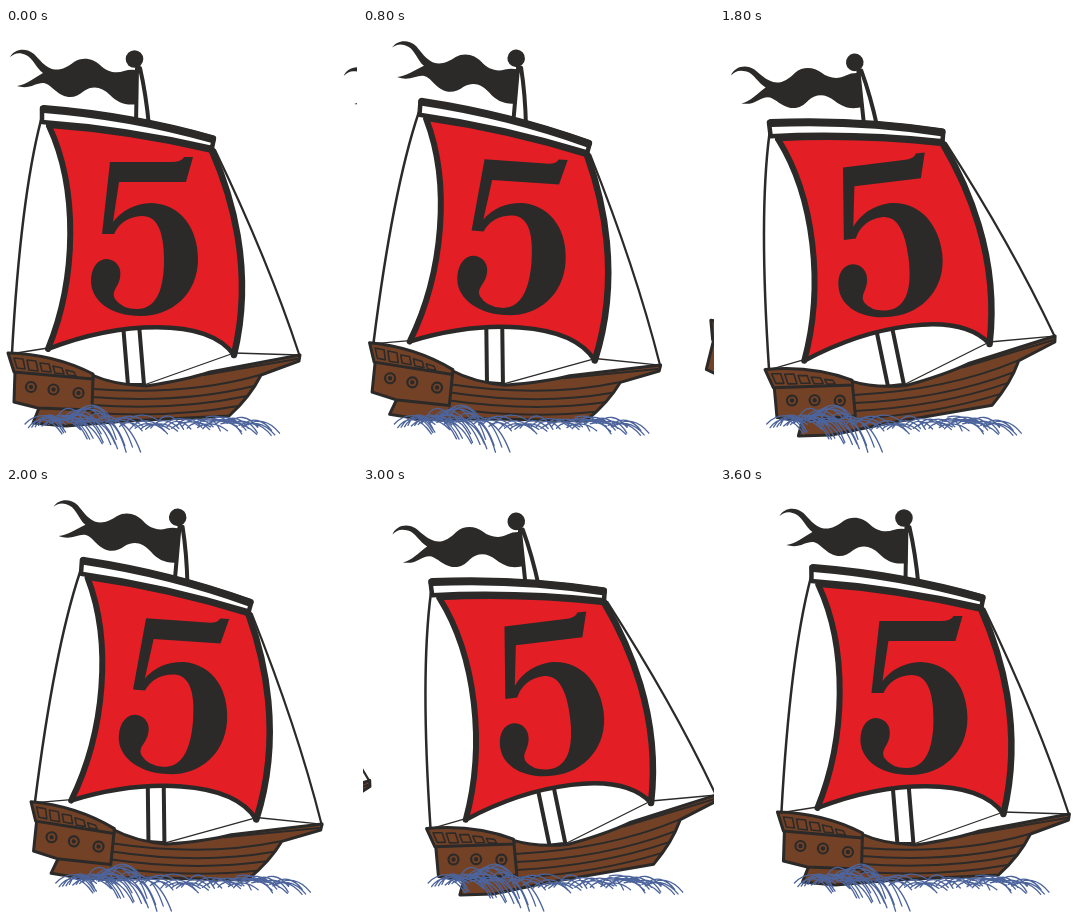
Animation of 351 by 431 pixels, one loop 3.8 s. Source, as an HTML page:

```html
<!DOCTYPE html>
<html lang="en">
<head>
<meta charset="utf-8">
<title>Sailing ship</title>
<style>
  html, body { margin: 0; width: 100%; height: 100%; overflow: hidden; background: #fff; }
  svg { display: block; width: 351px; height: 431px; }
  .ink { fill: #2b2a29; }
  .line { fill: none; stroke: #2b2a29; stroke-linecap: round; stroke-linejoin: round; }
  .wood { fill: #734226; stroke: #2b2a29; stroke-width: 3; stroke-linejoin: round; }
  .ring { fill: #734226; stroke: #2b2a29; stroke-width: 2.2; }
  .white { fill: #fff; stroke: #2b2a29; stroke-linejoin: round; }
  .sail { fill: #e31e24; }
  .water { fill: none; stroke: #4c649b; stroke-width: 1.3; stroke-linecap: round; }
</style>
</head>
<body>
<svg viewBox="0 0 351 431">
  <defs>
    <g id="ship">
      <!-- rigging -->
      <path class="line" stroke-width="2.5" d="M35 92C20 150 11 235 6 325"/>
      <path class="line" stroke-width="2.2" d="M209 122C236 178 270 256 293 326"/>
      <path class="line" stroke-width="1.3" d="M4 326L42 320M138 357L228 325L293 327"/>

      <!-- mast and flag -->
      <path class="white" stroke-width="4" d="M117 296L122 357H138L133 296"/>
      <path class="white" stroke-width="4" d="M130 96L131 40H134Q140 66 143 98"/>
      <path class="ink" d="M4 29C8 21 20 19 28 26C34 32 38 38 46 41C54 43 60 40 68 34C77 28 88 31 94 37C101 44 110 46 118 43Q124 41 130 42L132 76C120 78 112 75 104 67C96 59 87 57 78 63C71 69 64 71 56 67C48 63 44 56 38 55C30 54 24 62 11 58C20 57 28 50 37 45C30 40 27 30 20 27C13 24 9 25 4 29Z"/>
      <circle class="ink" cx="128.500" cy="31" r="8.800"/>

      <!-- sail and yard -->
      <path class="sail" d="M43 98Q125 104 206 123C224 164 249 240 228 327C200 288 112 294 42 321C71 250 72 160 43 98Z"/>
      <path class="line" stroke-width="6" d="M43 97Q125 103 206 122"/>
      <path class="line" stroke-width="6.500" d="M206 123C224 164 249 240 228 327"/>
      <path class="line" stroke-width="4.500" d="M228 327C200 288 112 294 42 321"/>
      <path class="line" stroke-width="6" d="M42 321C71 250 72 160 43 98"/>
      <path class="white" stroke-width="4.500" d="M36 80Q125 87 208 110L206 120Q120 100 36 94Z"/>
      <path class="line" stroke-width="8" d="M38 81Q125 88 206 111"/>
      <path class="ink" role="img" aria-label="5" d="M104 134H165Q176 134 178 129H187L180 154H113L107 194Q121 176 145 175C176 176 192 202 192 231C192 266 166 288 135 288C104 288 85 272 85 253C85 239 92 231 101 231C111 232 116 240 114 250C112 260 105 263 109 271Q116 281 131 281C153 281 158 256 158 232C158 203 151 188 136 188Q116 189 108 206H96Z"/>

      <!-- hull -->
      <path class="wood" d="M86 347Q108 357 140 358Q180 352 204 344L294 327L293 333L255 347Q244 369 223 388L120 393L60 398L27 395L33 380Z"/>
      <path class="line" stroke-width="2" d="M87 361Q180 368 254 347M86 369Q175 376 248 358M86 377Q170 383 241 368M86 385Q165 390 232 378M198 347L291 331"/>
      <path class="wood" d="M9 343L87 349L86 382L32 380L8 374Z"/>
      <path class="wood" stroke-width="4" d="M2 325Q48 326 87 346V351L8 344Z"/>
      <path class="line" stroke-width="1.600" d="M8 330L17 331L19 341L11 340ZM21 332L30 333L32 343L23 342ZM34 335L43 336L45 344L36 343ZM47 338L56 340L58 346L49 345ZM60 342L68 344L70 348L62 347Z"/>
      <g class="ring">
        <circle cx="25" cy="359" r="5"/>
        <circle cx="47.500" cy="361.500" r="5"/>
        <circle cx="72.500" cy="365" r="5"/>
      </g>
      <g class="ink">
        <circle cx="25" cy="359" r="2.200"/>
        <circle cx="47.500" cy="361.500" r="2.200"/>
        <circle cx="72.500" cy="365" r="2.200"/>
      </g>
    </g>
  </defs>
  <g id="fleet">
    <use href="#ship"/>
    <use href="#ship"/>
    <use href="#ship"/>
  </g>
  <path id="water" class="water"/>
</svg>
<script>
  const STEP = 200, LOOP = 3800, DRIFT = 3.08, SPACING = 355;
  const TILT = [0, -7.2, -12, -7, 4, 12.2];
  const ships = [...document.getElementById('fleet').children];
  const water = document.getElementById('water');

  let seed = 7;
  const rand = (min, max) => {
    seed = (seed * 16807) % 2147483647;
    return min + (max - min) * seed / 2147483647;
  };

  // Each strand rises over a small crest, then sweeps down to the right.
  const strand = (x, y, width, crest, drop) =>
    `M${x} ${y}c${width * 0.25} ${-crest} ${width * 0.65} ${-crest} ${width} ${drop}`;

  function drawWater() {
    let d = '';
    for (let i = 0; i < 17; i++) {
      d += strand(19 + i * 3.4, 399 - i * 0.7 + rand(-3, 3), rand(24, 42), rand(9, 17), rand(-2, 9));
    }
    for (let i = 0; i < 14; i++) {
      d += strand(50 + i * 3.8, 391 + rand(-3, 5), rand(26, 36), rand(2, 9), 16 + i * 0.9 + rand(-3, 4));
    }
    for (let i = 0; i < 20; i++) {
      d += strand(98 + i * 5.2, 399 + rand(-4, 3), rand(22, 40), rand(5, 12), rand(-3, 5));
    }
    for (let i = 0; i < 17; i++) {
      d += strand(194 + i * 3, 391 + i * 0.3 + rand(-3, 4), rand(20, 36), rand(1, 8), rand(4, 11));
    }
    water.setAttribute('d', d);
  }

  // The ships rock one pose apart; the water only drifts.
  function render(now) {
    const step = Math.floor((now % LOOP) / STEP);
    const drift = step * DRIFT;
    ships.forEach((ship, i) => {
      const place = i - 1;
      const tilt = TILT[(step + place + 6) % 6];
      ship.setAttribute('transform', `translate(${drift + place * SPACING} 0) rotate(${tilt} 145 208)`);
    });
    water.setAttribute('transform', `translate(${drift} 0)`);
  }

  drawWater();
  const start = performance.now();
  const tick = () => {
    render(performance.now() - start);
    requestAnimationFrame(tick);
  };
  tick();
</script>
</body>
</html>
```
